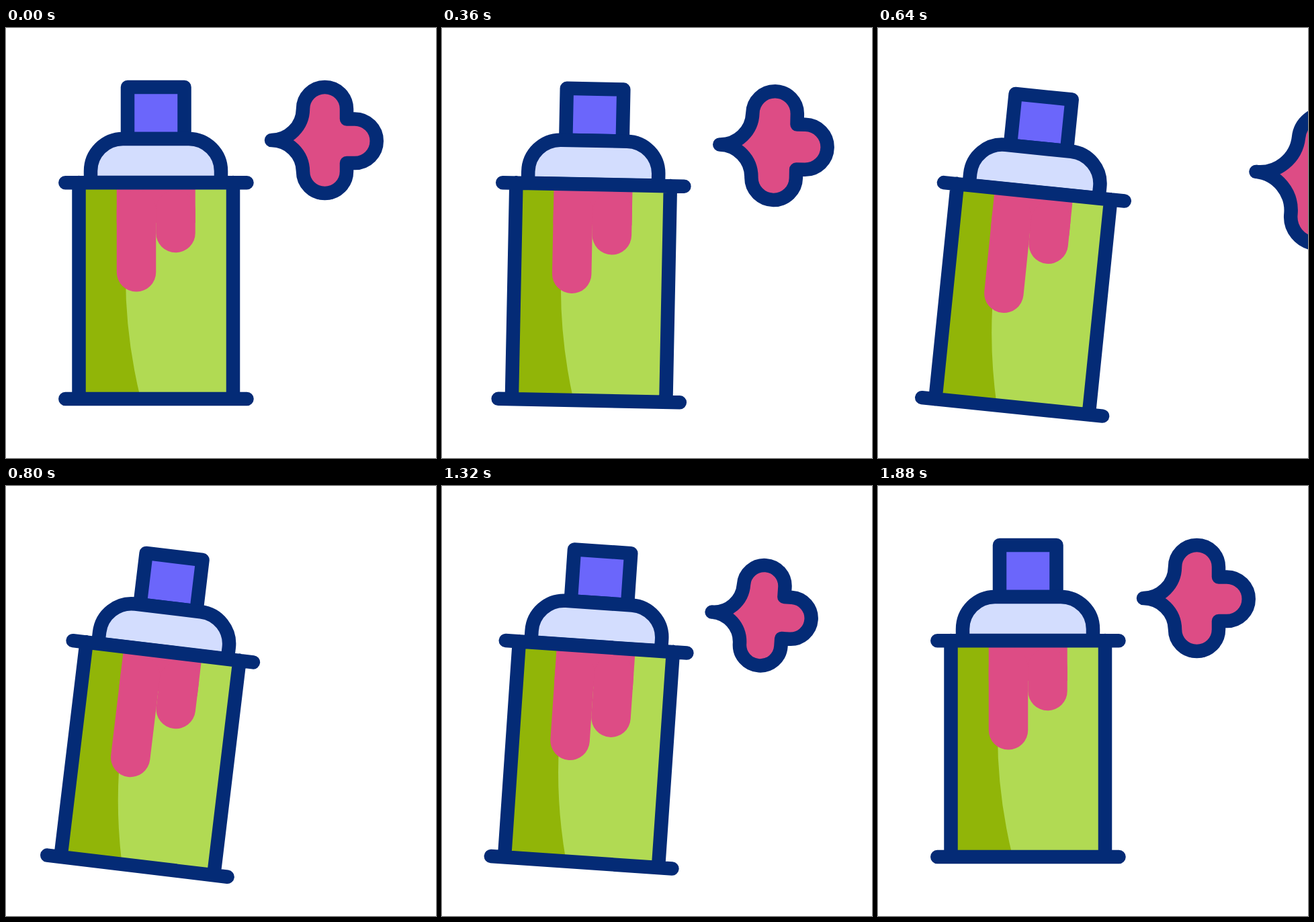
Animation, 640 px wide and 640 px high, one loop 1.96 s. Source, as an HTML page:

```html
<!DOCTYPE html>
<html lang="en">
<head>
<meta charset="utf-8">
<title>Spray can</title>
<style>
html, body { margin: 0; width: 100%; height: 100%; overflow: hidden; background: #fff; }
svg { display: block; width: 100%; height: 100%; }
.line { stroke: #042b76; stroke-width: 20.5; stroke-linecap: round; stroke-linejoin: round; }
.drip { stroke: #dd4c85; stroke-width: 58.5; stroke-linecap: round; }
</style>
</head>
<body>
<svg viewBox="0 0 640 640">
  <g id="can">
    <path id="cloud" class="line" fill="#dd4c85" d="M395 167A47 47 0 0 0 442 120.5a32.5 32.5 0 0 1 65 0V135.5H519a32.75 32.75 0 0 1 0 65.5H507V213.5a32.5 32.5 0 0 1-65 0A47 47 0 0 0 395 167z"/>
    <path class="line" fill="#6b66fb" d="M181 165V88H265.5V165z"/>
    <path class="line" fill="#d3ddfe" d="M126 230V213a48 48 0 0 1 48-48h98a48 48 0 0 1 48 48V230z"/>
    <path fill="#b1da53" d="M108 230H338V552H108z"/>
    <path fill="#91b508" d="M108 230H178V370Q178 461 200.4 552H108z"/>
    <path fill="#dd4c85" d="M164.75 230H281.75V290H164.75z"/>
    <line id="left" class="drip" x1="194" y1="270" x2="194"/>
    <line id="right" class="drip" x1="252.5" y1="270" x2="252.5"/>
    <path class="line" fill="none" d="M88.3 230.3H358.5M88.3 552H358.5M108.5 230V552M338 230V552"/>
  </g>
</svg>
<script>
const LOOP = 1960, STEP = 40;
const get = id => document.getElementById(id);
const can = get('can'), cloud = get('cloud'), left = get('left'), right = get('right');

const clamp = p => Math.min(1, Math.max(0, p));
const span = (t, a, b) => clamp((t - a) / (b - a));

// cubic-bezier(.6, 0, .4, 1), solved by bisection
function ease(x) {
  let lo = 0, hi = 1;
  for (let i = 0; i < 24; i++) {
    const u = (lo + hi) / 2, v = 1 - u;
    if (1.8 * u * v * v + 1.2 * u * u * v + u ** 3 < x) lo = u; else hi = u;
  }
  return lo * lo * (3 - 2 * lo);
}

const drip = t => 30 * (ease(span(t, 280, 880)) - ease(span(t, 920, 1600)));

function setCloud(t) {
  let scale = 1, shift = 0;
  if (t < 800) {
    const q = (Math.max(0, t - 120) / 400) ** 3;
    scale = 1 + 0.107 * q;
    shift = 63 * q;
  } else {
    scale = 1 - (1 - span(t, 920, 1440)) ** 2;
  }
  cloud.style.display = scale > 0 ? '' : 'none';
  if (!scale) return;
  cloud.setAttribute('transform',
    `translate(${329.5 + shift} 167) scale(${scale}) translate(-329.5 -167)`);
  cloud.style.strokeWidth = 20.5 / scale;
}

function draw(now) {
  const t = Math.floor(now % LOOP / STEP) * STEP;
  const angle = 7 * (ease(span(t, 80, 920)) - ease(span(t, 920, 1760)));
  can.setAttribute('transform', `rotate(${angle} 95 325)`);
  left.setAttribute('y2', 363.2 + drip(t));
  right.setAttribute('y2', 305 + drip(t - 280));
  setCloud(t);
}

let start;
function tick(now) {
  start ??= now;
  draw(now - start);
  requestAnimationFrame(tick);
}
draw(0);
requestAnimationFrame(tick);
</script>
</body>
</html>
```
